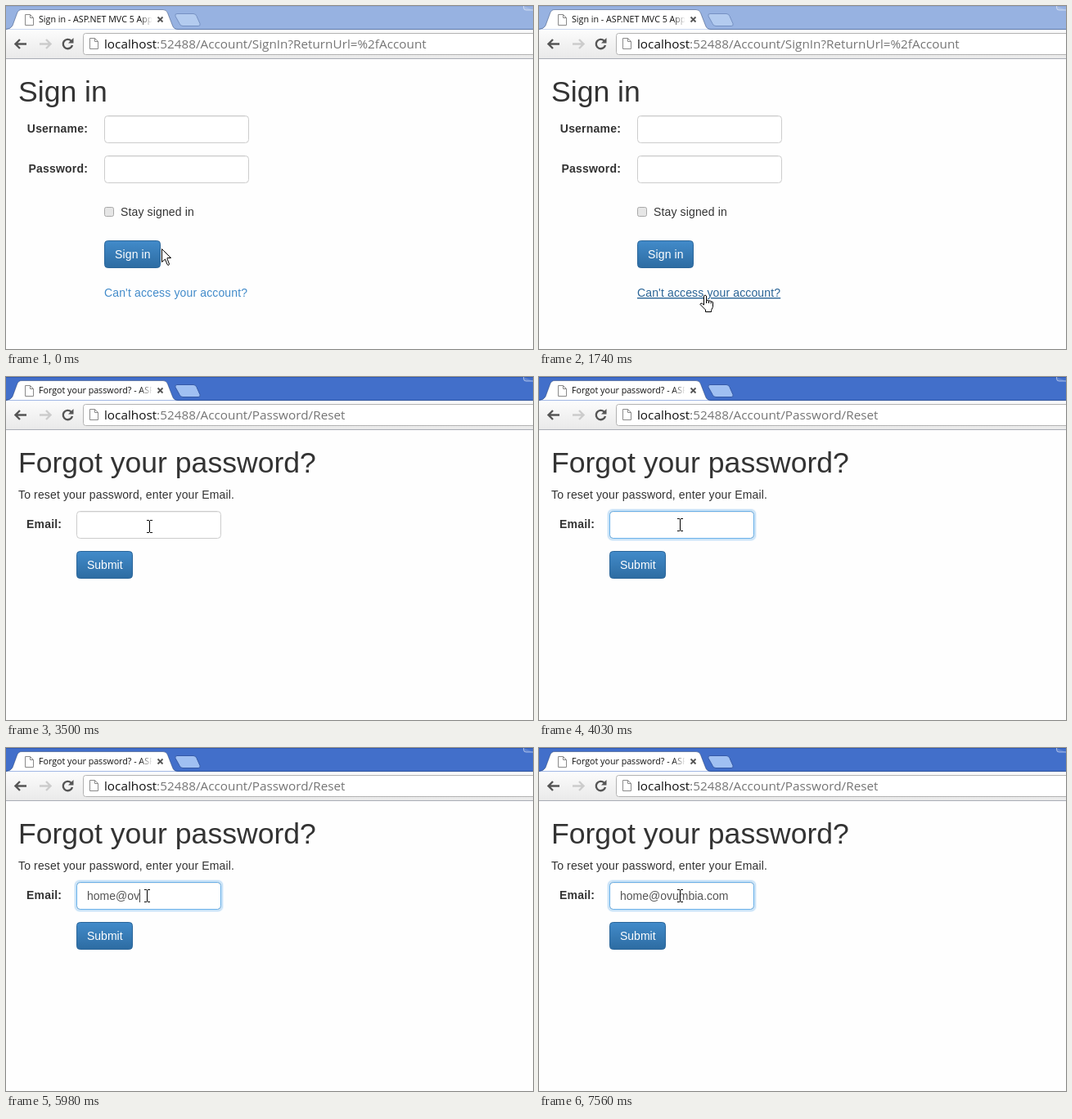
An HTML page that plays this animation: 644 px wide and 420 px high, repeating every 8 s.

```html
<!DOCTYPE html>
<html lang="en">
<head>
<meta charset="utf-8">
<title>Password reset</title>
<style>
html, body { margin: 0; width: 100%; height: 100%; overflow: hidden; background: #fefefe; }
svg { display: block; width: 644px; height: 420px; }
text { font: 14px "Liberation Sans", Arial, sans-serif; fill: #333; white-space: pre; }
.h1 { font-size: 35.6px; }
.body { letter-spacing: .14px; }
.b { font-weight: bold; letter-spacing: .2px; }
.end { text-anchor: end; }
.white { fill: #fff; }
.url, .title { font-family: "Open Sans", "Noto Sans", sans-serif; }
.url { font-size: 15.3px; fill: #757575; }
.url tspan { fill: #111; }
.title { font-size: 10.7px; fill: #111; }
.field { fill: #fff; stroke: #ccc; }
.btn { fill: url(#blue); stroke: #2b669a; }
.icon { fill: none; stroke: #555; stroke-width: 2.4; }
.page { fill: #fff; stroke: #8a8a8a; }
.cur { fill: #fff; stroke: #000; }
.outline { fill: none; stroke: #1c3462; stroke-opacity: .45; }
</style>
</head>
<body>
<svg viewBox="0 0 644 420">
  <defs>
    <linearGradient id="blue" x2="0" y2="1">
      <stop stop-color="#428bca"/><stop offset="1" stop-color="#2d6ca2"/>
    </linearGradient>
    <linearGradient id="bar" x2="0" y2="1">
      <stop stop-color="#fcfcfc"/><stop offset="1" stop-color="#e9e9e9"/>
    </linearGradient>
    <linearGradient id="fade" gradientUnits="userSpaceOnUse" x1="164" x2="179">
      <stop stop-color="#fff" stop-opacity="0"/><stop offset="1" stop-color="#fff"/>
    </linearGradient>
    <clipPath id="clip"><path d="M38 6h140v20H38z"/></clipPath>
    <path id="doc" d="M.5.5h6l4 4v9H.5zM6.5.5v4h4"/>
    <path id="tab" d="M0 28.5Q6 28 8 24L13.500 9Q15 4.500 19 4.500H192Q196 4.500 197.500 8.500L203.500 24Q205 28.500 210 28.500"/>
  </defs>

  <!-- browser window -->
  <rect id="frame" width="644" height="29"/>
  <path id="edge" d="M0 .5h644"/>
  <path d="M632.500 0v2q0 3 3 3H644" fill="#fff" fill-opacity=".15" stroke="#fff" stroke-opacity=".5"/>
  <path id="plus" d="M209 9.5h20q3 0 4 3l4 9q1 3-2 3h-19q-3 0-4-3l-5-9q-1-3 2-3z"/>
  <rect y="29" width="644" height="36" fill="url(#bar)"/>
  <path d="M0 64.5H644" stroke="#a9adb5"/>
  <use href="#tab" fill="#fff"/>
  <use href="#tab" class="outline"/>
  <path class="outline" d="M210 28.500H644"/>
  <g clip-path="url(#clip)"><text id="title" class="title" x="40" y="20"></text></g>
  <path d="M164 7h15v18h-15z" fill="url(#fade)"/>
  <path d="M185.500 13.500l6 6m0-6l-6 6" stroke="#555" stroke-width="1.800"/>
  <use id="favicon" href="#doc" class="page" x="23" y="10"/>
  <path id="spinner" d="M26 12q2-1.500 5-.5" fill="none" stroke="#888" stroke-width="1.500"/>
  <path class="icon" d="M25 46.500H12m5-5.500l-5.500 5.500L17 52"/>
  <path class="icon" d="M41 46.500h13M49 41l5.500 5.500L49 52" style="stroke:#ccc"/>
  <g id="reload">
    <path class="icon" d="M79.500 42.500A5.700 5.700 0 1 0 81 48"/>
    <path d="M82.500 39v6.500H76z" fill="#555"/>
  </g>
  <path id="stop" class="icon" d="M69.500 40.500l12 12m0-12l-12 12"/>
  <rect x="94.500" y="33.500" width="560" height="26" rx="3" fill="#fff" stroke="#b2b2b2"/>
  <use href="#doc" class="page" x="102" y="39"/>
  <text class="url" x="120" y="52"><tspan>localhost</tspan><tspan id="path" style="fill:inherit"></tspan></text>

  <g id="signIn">
    <text class="h1" x="15" y="117">Sign in</text>
    <text class="b end" x="100" y="155">Username:</text>
    <text class="b end" x="100" y="204">Password:</text>
    <rect class="field" x="120.500" y="134.500" width="176" height="33" rx="4"/>
    <rect class="field" x="120.500" y="183.500" width="176" height="33" rx="4"/>
    <path d="M123 135.500h171M123 184.500h171" stroke="#eee"/>
    <rect x="120.500" y="246.500" width="11" height="11" rx="2" fill="#e6e6e6" stroke="#a8a8a8"/>
    <text class="body" x="140" y="257">Stay signed in</text>
    <rect class="btn" x="120.500" y="287.500" width="68" height="33" rx="4"/>
    <text class="white body" x="133" y="309">Sign in</text>
    <text id="link" class="body" x="120" y="356">Can't access your account?</text>
  </g>

  <g id="reset">
    <text class="h1" x="15" y="117">Forgot your password?</text>
    <text class="body" x="15" y="149">To reset your password, enter your Email.</text>
    <text class="b" x="25" y="185">Email:</text>
    <g id="glow" fill="none" stroke="#66afe9" stroke-width="2">
      <rect x="85" y="163" width="179" height="36" rx="5" opacity=".3"/>
      <rect x="84" y="162" width="181" height="38" rx="6" opacity=".12"/>
    </g>
    <rect class="field" x="86.500" y="164.500" width="176" height="33" rx="4"/>
    <path d="M89 165.500h171" stroke="#eee"/>
    <rect id="ring" x="86.500" y="164.500" width="176" height="33" rx="4" fill="none" stroke="#66afe9"/>
    <text id="email" x="99" y="186" style="fill:#555"></text>
    <rect id="caret" y="173" width="1" height="16" fill="#444"/>
    <rect class="btn" x="86.500" y="213.500" width="68" height="33" rx="4"/>
    <text class="white" x="99" y="235">Submit</text>
  </g>

  <path id="arrow" class="cur" d="M.5 .5V16.500L4.500 13 7 19.500 8.500 20.500 9.500 19 7 12.500V11.500H11.500z"/>
  <path id="hand" class="cur" d="M5.500 13V2q1.500-2 3 0V7.500q1.600-1 3 .5 1.600-.8 2.700.8 2-.3 2.300 1.200v5.500l-2 4v2H7.500v-2.500L1 12.500q.3-2 2.300-1.300zM8.500 7.500V11M11.500 8v3M14.200 9v2.500"/>
  <path id="beam" d="M0 .5h3m1 0h3M3.500 1v14M0 15.500h3m1 0h3" fill="none" stroke="#000"/>
</svg>
<script>
const LOOP = 8000, ADDRESS = "home@ovumbia.com";
const $ = id => document.getElementById(id);
const set = (id, attrs) => { for (const k in attrs) $(id).setAttribute(k, attrs[k]); };
const show = (id, on) => set(id, { visibility: on ? "visible" : "hidden" });

// [time, shape, x, y]
const pointer = [
  [0, "arrow", 190, 297], [150, "arrow", 189, 304], [270, "arrow", 187, 320],
  [400, "arrow", 185, 336], [520, "hand", 178, 344], [1480, "hand", 184, 348],
  [1620, "hand", 192, 351], [1740, "hand", 196, 353], [2670, "arrow", 201, 354],
  [3200, "arrow", 178, 220], [3350, "arrow", 175, 199], [3500, "beam", 172, 175],
  [3650, "beam", 169, 173]
];
// [time, letters typed]
const typing = [
  [3530, 0], [4460, 2], [4600, 4], [5490, 5], [5610, 6], [5980, 7], [6130, 8],
  [6250, 9], [6390, 10], [6510, 11], [6630, 12], [6780, 13], [6930, 15], [7060, 16]
];
const latest = (list, t) => list.filter(e => e[0] <= t).pop() || list[0];

function draw(t) {
  const second = t >= 2670, loading = second && t < 2820;
  set("frame", { fill: second ? "#426fca" : "#97b2e1" });
  set("edge", { stroke: second ? "#2f5bb8" : "#8ba6d8" });
  set("plus", { fill: second ? "#a0c0f2" : "#b3cbef", stroke: second ? "#3559a6" : "#7590c2" });
  $("title").textContent = loading ? "localhost:52488/Account/Password/Reset"
    : second ? "Forgot your password? - ASP.NET" : "Sign in - ASP.NET MVC 5 Application";
  $("path").textContent = ":52488/Account/" + (second ? "Password/Reset" : "SignIn?ReturnUrl=%2fAccount");
  show("favicon", !loading);
  show("spinner", loading);
  show("reload", !loading);
  show("stop", loading);
  show("signIn", !second);
  show("reset", second);

  const [, shape, x, y] = latest(pointer, t);
  for (const id of ["arrow", "hand", "beam"]) show(id, id === shape);
  set(shape, { transform: `translate(${x} ${y})` });
  const hover = shape === "hand";
  set("link", {
    style: `fill:${hover ? "#2a6496" : "#428bca"};text-decoration:${hover ? "underline" : "none"}`
  });

  const focus = t < 3650 ? 0 : t < 3780 ? .5 : 1;
  set("glow", { opacity: focus });
  set("ring", { opacity: focus });
  const [since, count] = latest(typing, t);
  $("email").textContent = ADDRESS.slice(0, count);
  set("caret", { x: 99 + Math.floor(count && $("email").getComputedTextLength()) });
  show("caret", focus && t - since < 500);
}

let start;
function tick(now) {
  start ??= now;
  draw((now - start) % LOOP);
  requestAnimationFrame(tick);
}
draw(0);
requestAnimationFrame(tick);
</script>
</body>
</html>
```
